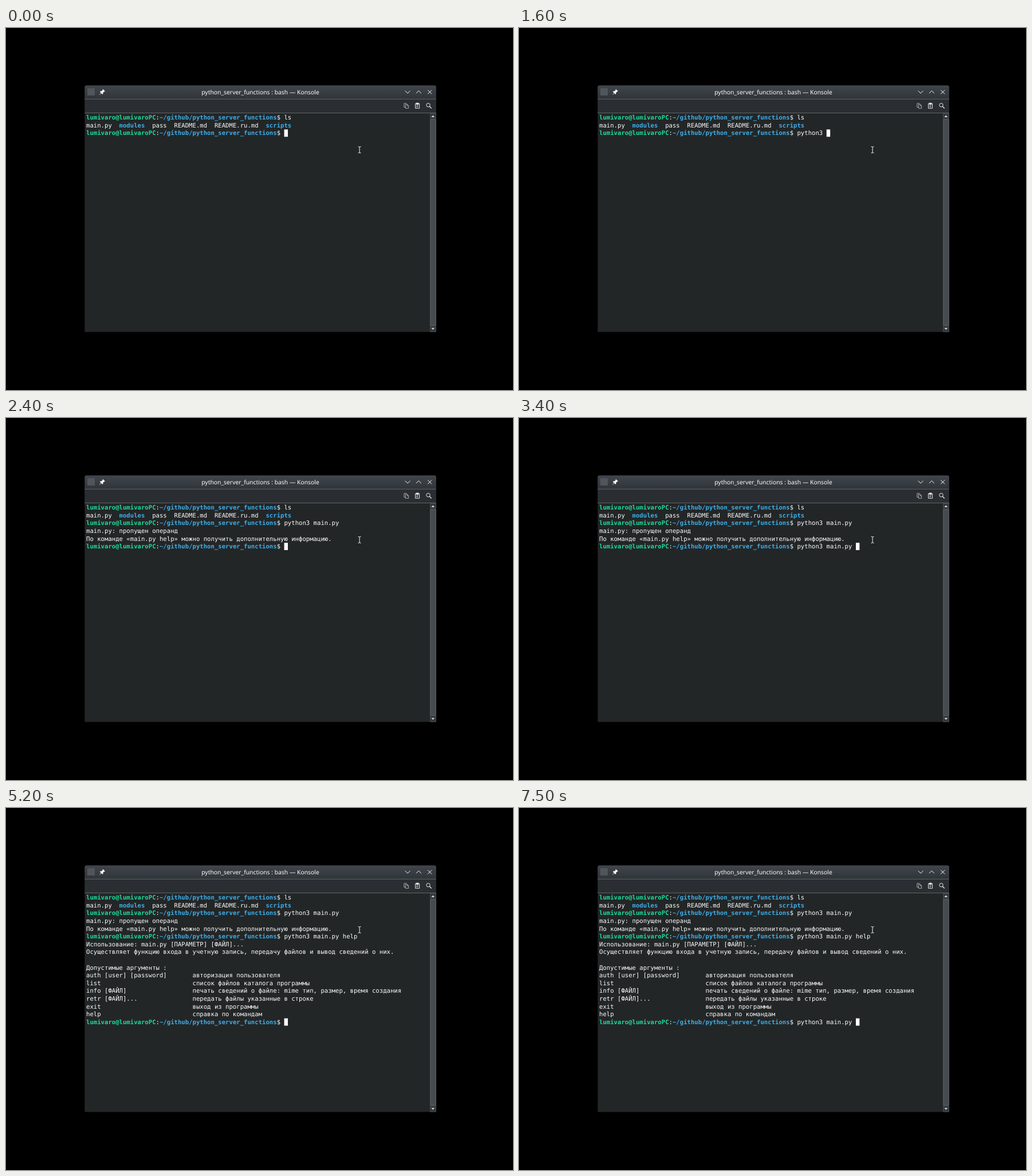
An HTML page for the animation above (8 s loop, 885 px wide and 633 px high).

```html
<!DOCTYPE html>
<html lang="ru">
<head>
<meta charset="utf-8">
<title>Terminal</title>
<style>
  html, body { margin: 0; width: 100%; height: 100%; overflow: hidden; background: #000; }
  svg { display: block; }
  text { white-space: pre; fill: #fcfcfc; text-rendering: geometricPrecision; }
  #screen { font: 10.63px "DejaVu Sans Mono", monospace; }
  .title { font: 12.96px "Noto Sans", sans-serif; font-size: 10.37px; text-anchor: middle; }
  .user, .dir { font-weight: bold; }
  .user { fill: #1cdc9a; }
  .dir { fill: #3daee9; }
  .icon { fill: none; stroke: #fcfcfc; }
</style>
</head>
<body>
<svg width="885" height="633" viewBox="0 0 885 633">
  <defs>
    <linearGradient id="bar" x2="0" y2="1">
      <stop stop-color="#40464c"/>
      <stop offset="1" stop-color="#30353a"/>
    </linearGradient>
  </defs>

  <!-- Window and bars -->
  <path d="M137.4 531.5V103.5q0-3 3-3H747.8q3 0 3 3V531.5z" fill="#232627"/>
  <path d="M137.4 124V103.5q0-3 3-3H747.8q3 0 3 3V124z" fill="url(#bar)"/>
  <path d="M137.4 124H750.8V149H137.4z" fill="#2a2e32"/>
  <path d="M137.4 124.4H750.8M137.4 148.6H750.8" stroke="#686c6f" stroke-width=".9"/>
  <text class="title" x="444" y="115.8">python_server_functions : bash — Konsole</text>

  <!-- Title bar icons -->
  <rect x="142" y="105.3" width="13" height="12.6" fill="#50565b"/>
  <path d="M169.2 107l3.6 3.6-1 .8-.7-.2-1.8 1.9.1 2.1-1 .9-2-2-2.900 2.700-.4-.4 2.700-2.900-2-2 .9-1 2.100.1 1.900-1.800-.3-.8z" fill="#fcfcfc"/>
  <path class="icon" d="M696.700 109.800l4.400 4.400 4.400-4.400M716 114.200l4.400-4.400 4.400 4.400M736.200 108.500l7 7m0-7l-7 7"/>

  <!-- Toolbar icons -->
  <g class="icon" stroke-width=".9">
    <path d="M697.200 138.600H694.900V131.800H699.500M697.400 133.500H700.400L702.700 135.800V140.400H697.400zM700.300 133.500V136H702.700" stroke="#b4b7b9"/>
    <path d="M716.500 132.200H714.600V140.400H721.600V132.200H719.700M716.400 136H719.800M716.400 138H718.800"/>
    <path d="M716.300 131.200H719.900V133.600H716.300z" fill="#fcfcfc"/>
    <circle cx="737" cy="134.800" r="3.200"/>
    <path d="M739.300 137.100L742.700 140.500" stroke-width="1.200"/>
  </g>

  <!-- Scroll bar -->
  <path d="M740.200 149H750.800V531.500H740.200z" fill="#303437"/>
  <path d="M740.700 149.400H750.300V159.200H740.700zM740.700 521H750.300V531H740.700z" fill="#32373b" stroke="#53585b" stroke-width=".8"/>
  <path d="M740.700 160.300H750.300V519.800H740.700z" fill="#464b4f" stroke="#65696c" stroke-width=".8"/>
  <path d="M742.300 155.900L745.300 152.600 748.300 155.900zM742.300 524.500L745.300 527.800 748.300 524.500z" fill="#d0d2d3"/>

  <g id="screen"></g>
  <rect id="caret" width="6.4" height="12.8" fill="#fff"/>
  <path class="icon" d="M614.700 207.500H616.300L617.100 208.300 617.900 207.500H619.500M617.100 208V218M614.700 218.500H616.300L617.100 217.700 617.900 218.500H619.500"/>
</svg>

<script>
const LOOP = 8000, LEFT = 140, CELL_W = 6.4, CELL_H = 13.6, PROMPT_COLS = 54;
const MAIN = "python3 main.py", HELP = MAIN + " help";
const span = (name, text) => `<tspan class="${name}">${text}</tspan>`;
const prompt = span("user", "lumivaro@lumivaroPC") + ":" +
  span("dir", "~/github/python_server_functions") + "$ ";
const option = (name, about) => name.padEnd(29) + about;

// Finished commands with their output, in order
const session = [
  ["ls", `main.py  ${span("dir", "modules")}  pass  README.md  README.ru.md  ${span("dir", "scripts")}`],
  [MAIN,
    "main.py: пропущен операнд",
    "По команде «main.py help» можно получить дополнительную информацию."],
  [HELP,
    "Использование: main.py [ПАРАМЕТР] [ФАЙЛ]...",
    "Осуществляет функцию входа в учетную запись, передачу файлов и вывод сведений о них.",
    "",
    "Допустимые аргументы :",
    option("auth [user] [password]", "авторизация пользователя"),
    option("list", "список файлов каталога программы"),
    option("info [ФАЙЛ]", "печать сведений о файле: mime тип, размер, время создания"),
    option("retr [ФАЙЛ]...", "передать файлы указанные в строке"),
    option("exit", "выход из программы"),
    option("help", "справка по командам")]
];

// [start time, finished commands, text being typed]
const steps = [
  [0, 1, ""], [500, 1, HELP], [600, 1, ""], [700, 1, "py"], [800, 1, "pyth"],
  [1000, 1, "python"], [1300, 1, "python3"], [1600, 1, "python3 "],
  [1800, 1, "python3 m"], [1900, 1, "python3 ma"], [2100, 1, MAIN + " "],
  [2400, 2, ""], [3400, 2, MAIN + " "], [4100, 2, MAIN + " he"], [4900, 2, HELP],
  [5200, 3, ""], [6000, 3, HELP], [6900, 3, MAIN + " hel"],
  [7200, 3, MAIN + " h"], [7500, 3, MAIN + " "]
];

const screenGroup = document.getElementById("screen");
const caret = document.getElementById("caret");
let shown;

function render([, done, typed]) {
  const lines = session.slice(0, done).flatMap(([cmd, ...out]) => [prompt + cmd, ...out]);
  lines.push(prompt + typed);
  screenGroup.innerHTML = lines.map((line, row) =>
    `<text x="${LEFT}" y="${160.1 + row * CELL_H}">${line}</text>`).join("");
  caret.setAttribute("x", LEFT + (PROMPT_COLS + typed.length) * CELL_W);
  caret.setAttribute("y", 150.2 + (lines.length - 1) * CELL_H);
}

function tick() {
  const time = performance.now() % LOOP;
  const step = steps.findLast(([start]) => start <= time);
  if (step !== shown) render(shown = step);
  requestAnimationFrame(tick);
}
tick();
</script>
</body>
</html>
```
